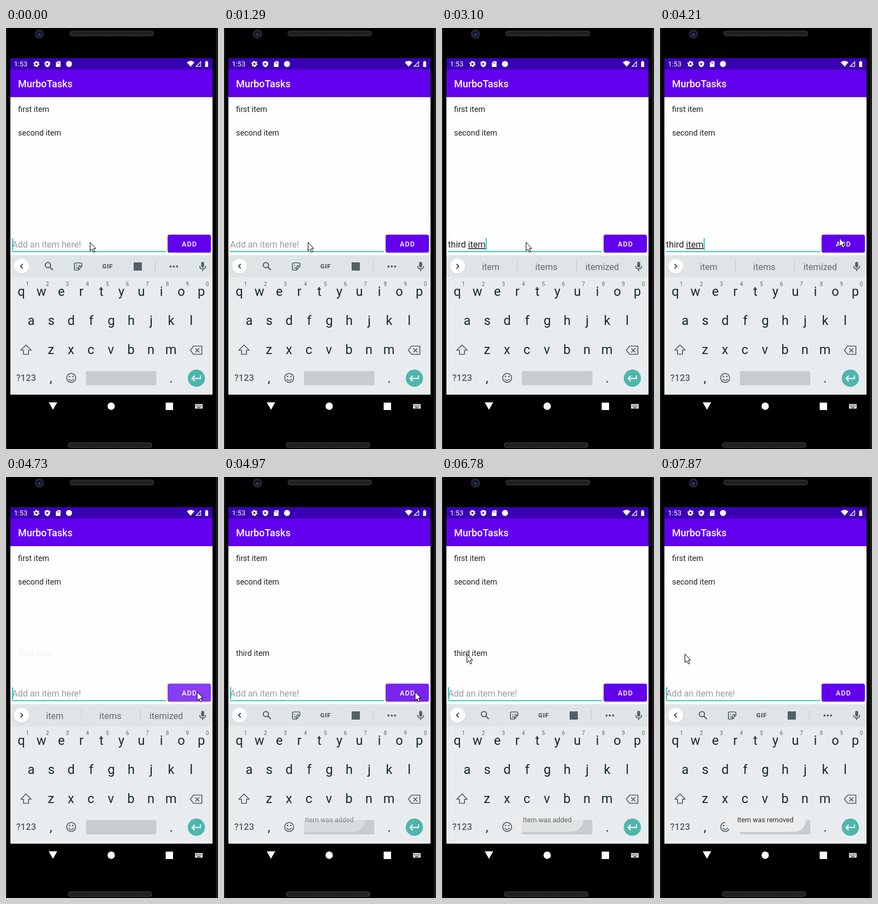
Write an HTML page that moves like this. It is 387 px wide and 767 px high and loops after 7990 ms.

```html
<!DOCTYPE html>
<html lang="en">
<head>
<meta charset="utf-8">
<style>
html, body { margin: 0; width: 100%; height: 100%; overflow: hidden; background: #000; }
svg { display: block; width: 387px; height: 767px; font-family: Roboto, sans-serif; }
text { white-space: pre; }
.mid { text-anchor: middle; }
.item { font-size: 14.37px; fill: #212121; }
.field { font-size: 16.17px; }
.key { font-size: 23.6px; fill: #17282e; }
.digit { font-size: 10px; fill: #5c6b72; }
.word { font-size: 16.17px; fill: #5f6b71; }
.line { fill: none; stroke: #526168; stroke-width: 1.7; stroke-linejoin: round; }
.grey { fill: #526168; }
</style>
</head>
<body>
<svg viewBox="0 0 387 767">
  <!-- Phone body -->
  <path fill="#191919" d="M0 0H387V767H0z"/>
  <path d="M2 0H383V767H2z"/>
  <circle cx="61" cy="11" r="8.5" fill="#25262b"/>
  <circle cx="61" cy="11" r="5" fill="#10132b"/>
  <circle cx="61" cy="12" r="2.2" fill="#34447d"/>
  <g fill="#262626" stroke="#393939">
    <rect x="116.5" y="5.5" width="153" height="9" rx="4"/>
    <rect x="113.5" y="755.500" width="153" height="9" rx="4"/>
  </g>
  <path stroke="#161616" stroke-width="6" stroke-dasharray="1.500 2" d="M120 10H267M117 760H264"/>

  <!-- Status and title bars -->
  <path fill="#fefefe" d="M8 126H377V414H8z"/>
  <path fill="#3a00b3" d="M8 55H377V76H8z"/>
  <path fill="#6200ee" d="M8 76H377V126H8z"/>
  <g fill="#fff">
    <text x="14.500" y="70" font-size="12.8">1:53</text>
    <g fill="none" stroke="#fff">
      <circle cx="55.500" cy="65.500" r="3.200" stroke-width="2.400"/>
      <circle cx="55.500" cy="65.500" r="4.700" stroke-width="1.800" stroke-dasharray="2.400 2.520"/>
    </g>
    <path fill-rule="evenodd" d="M75.500 60l5 2v3.500q0 4-5 6-5-2-5-6V62zM73.800 63v5l4-2.500z"/>
    <path fill-rule="evenodd" d="M94 60.500h5.500v10.500h-8.500v-7.500zM94 62.500v2.300h1v-2.300zm2 0v2.300h1v-2.300z"/>
    <circle cx="115" cy="65.500" r="5.500"/>
    <path d="M337 70.500l-7-8q7-5.500 14 0zM363.500 61.500h1.500v-1.500h2.500v1.500h1.500v9.500h-5.500z"/>
    <path fill-rule="evenodd" d="M356 60v10.500h-10.500zM354.800 63v6.300h-6.300z"/>
    <text x="22" y="108" font-size="17.97" font-weight="500">MurboTasks</text>
  </g>

  <!-- List and entry row -->
  <text class="item" x="22" y="153.300">first item</text>
  <text class="item" x="22" y="196.400">second item</text>
  <text class="item" x="22" y="325.500" id="third">third item</text>
  <text class="field" x="11" y="400" fill="#9b9b9b" id="hint">Add an item here!</text>
  <text class="field" x="11" y="400" fill="#212121"><tspan id="done"></tspan><tspan id="live" text-decoration="underline"></tspan></text>
  <path fill="#1cc0b1" d="M11 406.500H292V408.300H11z"/>
  <rect id="caret" y="383" width="1.800" height="22" fill="#08cbb9"/>
  <rect x="295" y="378" width="79" height="32.500" rx="4" fill="#d2cddb"/>
  <rect x="295" y="376.500" width="79" height="32.500" rx="3.500" fill="#6200ee"/>
  <rect x="295" y="376.500" width="79" height="32.500" rx="3.500" fill="#fff" id="ripple"/>
  <text class="mid" x="335" y="398" font-size="12.57" font-weight="500" letter-spacing="1.12" fill="#fff">ADD</text>

  <!-- Keyboard -->
  <path fill="#e8ecef" d="M8 414H377V668H8z"/>
  <path fill="#dfe4e7" d="M8 414H377V454H8z"/>
  <circle cx="28.500" cy="435" r="13.800" fill="#cdd2d5"/>
  <circle cx="28.500" cy="434" r="13.500" fill="#fff"/>
  <path id="chevron" fill="none" stroke="#37474f" stroke-width="1.800"/>
  <g id="tools">
    <g class="line">
      <circle cx="76.500" cy="432" r="4.800" stroke-width="2"/>
      <path stroke-width="2.200" d="M80 435.500l5.500 5.500"/>
      <path d="M138.500 434v-4q0-2-2-2h-9.500q-2 0-2 2v9q0 2 2 2h5.500zl-6 7v-5q0-2 2-2zM128.500 436q1 2 3 2"/>
    </g>
    <g class="grey">
      <circle cx="129" cy="432.500" r="1.100"/><circle cx="134.500" cy="432.500" r="1.100"/>
      <text class="mid" x="185.500" y="438" font-size="11.500" font-weight="900" letter-spacing=".7">GIF</text>
      <rect x="233" y="427" width="15" height="15"/>
      <circle cx="300.300" cy="434.500" r="1.900"/><circle cx="306.300" cy="434.500" r="1.900"/><circle cx="312.300" cy="434.500" r="1.900"/>
    </g>
    <path stroke="#c3c9cc" d="M272.500 424V444"/>
  </g>
  <g id="words">
    <path stroke="#c3c9cc" d="M137.500 423V445M245.500 423V445"/>
    <text class="word mid" x="89" y="440.500"></text>
    <text class="word mid" x="190.500" y="440.500"></text>
    <text class="word mid" x="292.500" y="440.500"></text>
  </g>
  <rect class="grey" x="356.300" y="426" width="5.400" height="10.500" rx="2.700"/>
  <path class="line" d="M353.500 433.500q0 5.500 5.500 5.500t5.500-5.500M359 439v4"/>
  <g id="keys"></g>
  <g class="line">
    <path d="M36.500 577.500l9.500 9.500h-5v7.500h-9v-7.500h-5z"/>
    <path d="M342.500 579.500h15v15h-15l-6-7.500zM345.500 583.500l7.500 7.500m0-7.500l-7.500 7.500"/>
    <circle cx="119" cy="637.500" r="8.200"/>
    <path d="M114.500 639.500q4.500 5.500 9 0"/>
  </g>
  <circle class="grey" cx="116" cy="635" r="1.400"/><circle class="grey" cx="122" cy="635" r="1.400"/>
  <text class="mid" x="37" y="643" font-size="16" font-weight="500" letter-spacing=".4" fill="#4c5b62">?123</text>
  <rect x="146" y="625" width="128.500" height="26" rx="3" fill="#c8ccce"/>
  <circle cx="347.500" cy="638" r="15.700" fill="#4db6ac"/>
  <path fill="none" stroke="#fff" stroke-width="1.900" d="M355 633v5.500h-15M344.500 633.500l-5 5 5 5"/>

  <!-- Navigation -->
  <path fill="#fff" d="M78 682H93.500L85.700 695.500zM291.500 682.500H305V696H291.500z"/>
  <circle cx="192" cy="689" r="6.700" fill="#fff"/>
  <rect x="345" y="685" width="14" height="8.500" rx="1" fill="#e6e6e6"/>
  <path stroke="#000" stroke-width="1.200" stroke-dasharray="1.200 1.200" d="M346.500 687.300H358M346.500 689.500H358"/>
  <path stroke="#000" stroke-width="1.100" d="M349 691.800H355"/>

  <g id="toast">
    <rect y="603" height="43.500" rx="21.700" fill="#ebedee"/>
    <text class="mid" x="192.300" y="629" font-size="12.57" fill="#333"></text>
  </g>
  <path id="mouse" fill="#fff" stroke="#000" stroke-linejoin="round" d="M.5.500V16L4 12.800 6.700 18.700 9.200 17.600 6.600 11.800H11z"/>
</svg>
<script>
const LOOP = 7990;
const $ = id => document.getElementById(id);

// Latest entry of a [time, ...values] track that has been reached.
const at = (track, t) => track.findLast(step => step[0] <= t);

// time, finished text, word being typed, suggestions, whether the middle one is bold
const typing = [
  [0, '', '', ''],
  [1830, '', 't', 't the this'],
  [1980, '', 'th', 'th the this'],
  [2130, '', 'thi', 'thi this think', true],
  [2280, '', 'thir', 'thir third this', true],
  [2400, '', 'third', 'third thirds think'],
  [2520, 'third ', '', 'time one party'],
  [2800, 'third ', 'it', 'it item its'],
  [2950, 'third ', 'ite', 'ite item its'],
  [3100, 'third ', 'item', 'item items itemized'],
  [4730, '', '', 'item items itemized'],
  [4850, '', '', '']
];
const caretFlips = [240, 870, 1290, 1830, 3600, 4090, 4610, 4730, 5220, 5750, 6270, 6780, 7200, 7600];
const pointer = [
  [0, 153, 390], [3970, 192, 383], [4090, 268, 374], [4210, 327, 382], [4330, 348.500, 391],
  [5870, 347, 390], [5990, 343, 388], [6270, 240, 362], [6390, 125, 329],
  [6510, 58, 312], [6660, 47, 317], [6780, 45, 322]
];
const ripple = [[0, 0], [4610, .12], [4730, .24], [4850, .22], [4970, .14], [5100, .06], [5220, 0]];
const thirdItem = [[0, 0], [4730, .06], [4850, .9], [4970, 1], [7450, .3], [7600, 0]];
const toast = [
  [0, 0], [4850, .15], [4970, .5], [5100, .8], [5220, 1],
  [6660, .9], [6780, .7], [6900, .45], [7050, .2], [7200, 0],
  [7450, .15], [7600, .5], [7750, .8], [7870, 1]
];

function addKey(label, x, y, kind = 'key') {
  $('keys').innerHTML += `<text class="${kind} mid" x="${x}" y="${y}">${label}</text>`;
}
const rows = [['qwertyuiop', 28, 488], ['asdfghjkl', 46, 541], ['zxcvbnm', 82, 594]];
for (const [letters, x, y] of rows) [...letters].forEach((c, i) => addKey(c, x + i * 36.5, y));
for (let i = 0; i < 10; i++) addKey((i + 1) % 10, 39 + i * 36.5, 470, 'digit');
addKey(',', 82, 646);
addKey('.', 301.5, 646);

const words = $('words').querySelectorAll('text');
const [toastBox, toastText] = $('toast').children;
const show = (id, opacity) => $(id).setAttribute('opacity', +opacity);

function draw(t) {
  const [, done, live, list, bold] = at(typing, t);
  $('done').textContent = done.replace(' ', '\u00a0');
  $('live').textContent = live;
  show('hint', !done && !live);
  show('tools', !list);
  show('words', !!list);
  list.split(' ').forEach((word, i) => words[i].textContent = word);
  words[1].style.fontWeight = bold ? 700 : 400;
  words[1].style.fill = bold ? '#111' : '';
  $('chevron').setAttribute('d', list ? 'M26.500 430l4 4-4 4' : 'M30.500 430l-4 4 4 4');

  const typed = done || live ? $('done').parentNode.getComputedTextLength() : 0;
  $('caret').setAttribute('x', 11.2 + typed);
  show('caret', caretFlips.filter(flip => flip <= t).length % 2 === 0);

  show('ripple', at(ripple, t)[1]);
  show('third', at(thirdItem, t)[1]);

  const removed = t >= 7450, width = removed ? 148 : 131;
  toastText.textContent = removed ? 'Item was removed' : 'Item was added';
  toastBox.setAttribute('width', width);
  toastBox.setAttribute('x', 192.3 - width / 2);
  show('toast', at(toast, t)[1]);

  const [, x, y] = at(pointer, t);
  $('mouse').setAttribute('transform', `translate(${x} ${y})`);
}

const start = performance.now();
function tick() {
  draw((performance.now() - start) % LOOP);
  requestAnimationFrame(tick);
}
tick();
</script>
</body>
</html>
```
